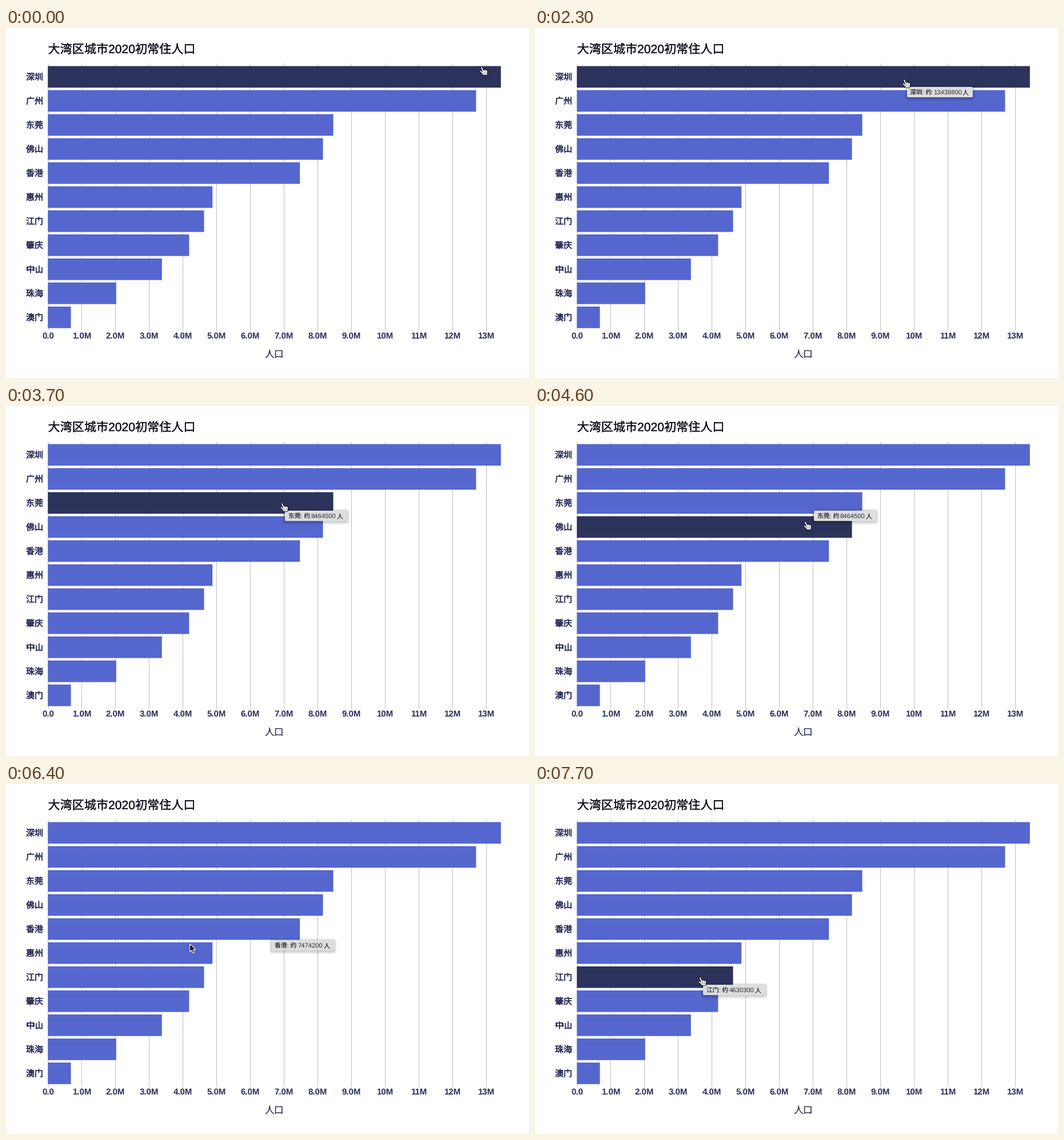
Write a matplotlib script that moves like this. It is 915x612 px and loops after 8 s.

```python
import numpy as np
import matplotlib.pyplot as plt
from matplotlib.animation import FuncAnimation
from matplotlib.collections import LineCollection
from matplotlib.patches import FancyBboxPatch, Polygon, Rectangle
from matplotlib.patheffects import Normal, Stroke

W, H, DPI = 915, 612, 64
PT = 72 / DPI                      # points per pixel
FRAMES, STEP = 80, 100

BAR, BAR_HOVER = "#5566cf", "#2c335b"
INK, GRID = "#2b2f5a", "#bdbdc1"
X0, UNIT = 73.5, 58.96             # axis origin, pixels per million
TOP, PITCH, THICK = 66.6, 42.05, 37.7

CITIES = {"深圳": 13438800, "广州": 12701948, "东莞": 8464500,
          "佛山": 8158600, "香港": 7474200, "惠州": 4880000,
          "江门": 4630300, "肇庆": 4187100, "中山": 3380000,
          "珠海": 2023700, "澳门": 679200}
NAMES = list(CITIES)

# Pointer moves: first step, length in steps, where it comes to rest.
# After the first move, each rest lies on the next bar down.
ENTRY = (836, 75)
MOVES = [(0, 5, 688, 86), (8, 3, 650, 97), (23, 4, 504, 138.5),
         (33, 1, 487, 177), (44, 2, 477, 209), (52, 4, 464, 267),
         (61, 6, 306, 299), (72, 5, 293, 345)]
FIRST_WAIT, WAIT = 9, 4            # steps from a move to its tooltip
REACH = 12                         # hover point above the pointer's middle

plt.rcParams["font.family"] = ["Liberation Sans", "Noto Sans CJK JP"]
plt.rcParams["text.hinting"] = "none"

fig = plt.figure(figsize=(W / DPI, H / DPI), dpi=DPI, facecolor="white")
ax = fig.add_axes([0, 0, 1, 1])
ax.set_xlim(0, W)
ax.set_ylim(H, 0)
ax.axis("off")


def label(x, y, s, px, color=INK, ha="left", weight="normal", thicken=0, z=3):
    text = ax.text(x, y, s, fontsize=px * PT, color=color, ha=ha,
                   va="baseline", weight=weight, zorder=z)
    if thicken:
        text.set_path_effects([Stroke(linewidth=thicken * PT, foreground=color),
                               Normal()])
    return text


# Static chart
for k in range(14):
    x = X0 + UNIT * k
    ax.plot([x, x], [62, 529], color=GRID, lw=PT, zorder=1,
            solid_capstyle="butt")
    tick = "0.0" if k == 0 else f"{k}.0M" if k < 10 else f"{k}M"
    label(x, 543, tick, 15, ha="center", weight="bold")

bars = []
for n, (city, people) in enumerate(CITIES.items()):
    y = TOP + PITCH * n
    bar = Rectangle((X0 - 0.3, y), people / 1e6 * UNIT + 0.3, THICK, color=BAR,
                    lw=0, zorder=2, snap=False)
    bars.append(ax.add_patch(bar))
    label(65, y + THICK / 2 + 5.3, city, 15, ha="right", thicken=0.6)

label(73.5, 44, "大湾区城市2020初常住人口", 21.1, color="#12121f", thicken=0.3)
label(469.5, 576.5, "人口", 16.8, color="#2d3050", ha="center")


# Tooltip
def rounded(r, color, alpha, z):
    box = FancyBboxPatch((0, 0), 1, 1, boxstyle=f"round,pad=0,rounding_size={r}",
                         fc=color, ec="none", lw=0, alpha=alpha, zorder=z)
    return ax.add_patch(box)


shadows = [(g, rounded(2 + g, "black", 0.035, 5)) for g in range(1, 6)]
tip_box = rounded(2, "#dededf", 1, 6)
tip_name, tip_num, tip_unit = [
    label(0, 0, "", px, color="#2a2a2e", z=7) for px in (10.8, 11.3, 10.8)]
tip_parts = [s for _, s in shadows] + [tip_box, tip_name, tip_num, tip_unit]


def show_tip(i):
    shown = [k for k, move in enumerate(MOVES)
             if k and i >= move[0] + (FIRST_WAIT if k == 1 else WAIT)]
    for part in tip_parts:
        part.set_visible(bool(shown))
    if not shown:
        return
    x, y = MOVES[shown[-1]][2] + 1, MOVES[shown[-1]][3] + 6
    city = NAMES[shown[-1] - 1]
    number = str(CITIES[city])
    digits = 6.3 * len(number)
    w, h = 64.5 + digits, 18
    tip_box.set_bounds(x, y, w, h)
    for g, s in shadows:
        s.set_bounds(x - g, y - g + 1.5, w + 2 * g, h + 2 * g)
    tip_name.set_text(f"{city}: 约")
    tip_num.set_text(number)
    tip_unit.set_text("人")
    for part, dx in ((tip_name, 5.5), (tip_num, 45.8), (tip_unit, 47 + digits)):
        part.set_position((x + dx, y + 13))


# Pointers, drawn around their middle; the hand is a set of round strokes
INDEX, THUMB = [(-4, -6), (-0.8, 2.5)], [(-5.6, 0.6), (-1.2, 4.8)]
PALM = [(-0.8, 5.6), (4.6, 5.6)]
KNUCKLES = [[(0.4 + 2.2 * k, -1.2 + 0.4 * k), (0.8 + 2 * k, 4)]
            for k in range(3)]
HAND = np.array([INDEX, THUMB, PALM, *KNUCKLES])
ARROW = np.array([(0, 0), (0, 13.6), (3, 10.8), (5.2, 15.8), (7.5, 14.8),
                  (5.4, 9.9), (9.7, 9.9)]) - (4, 8)

hand = [ax.add_collection(LineCollection(HAND, colors=c, linewidths=w * PT,
                                         capstyle="round", zorder=z),
                          autolim=False)
        for c, w, z in (("black", 3.6, 9), ("white", 1.9, 10))]
arrow = ax.add_patch(Polygon(ARROW, fc="black", ec="white", lw=1.1 * PT,
                             joinstyle="round", zorder=9))


def pointer(i):
    """Ease out along each move, sideways faster than down."""
    pos = np.array(ENTRY, float)
    for start, length, x, y in MOVES:
        left = 1 - np.clip((i - start) / length, 0, 1)
        pos += (np.array([x, y]) - pos) * (1 - left ** np.array([3, 1.5]))
    return pos


def hovered(y):
    """Row under the pointer, or None in the gap between two bars."""
    row, inside = divmod(max(y - REACH - TOP, 0), PITCH)
    return int(row) if inside <= THICK else None


def draw(i):
    pos = pointer(i)
    row = hovered(pos[1])
    for n, bar in enumerate(bars):
        bar.set_facecolor(BAR_HOVER if n == row else BAR)
    show_tip(i)

    arrow.set_visible(row is None)
    arrow.set_xy(ARROW + pos)
    for strokes in hand:
        strokes.set_visible(row is not None)
        strokes.set_segments(HAND + pos)
    return [arrow, *hand, *bars, *tip_parts]


anim = FuncAnimation(fig, draw, frames=FRAMES, interval=STEP, repeat=True,
                     repeat_delay=0, init_func=lambda: draw(0), blit=False)
plt.show()
```
